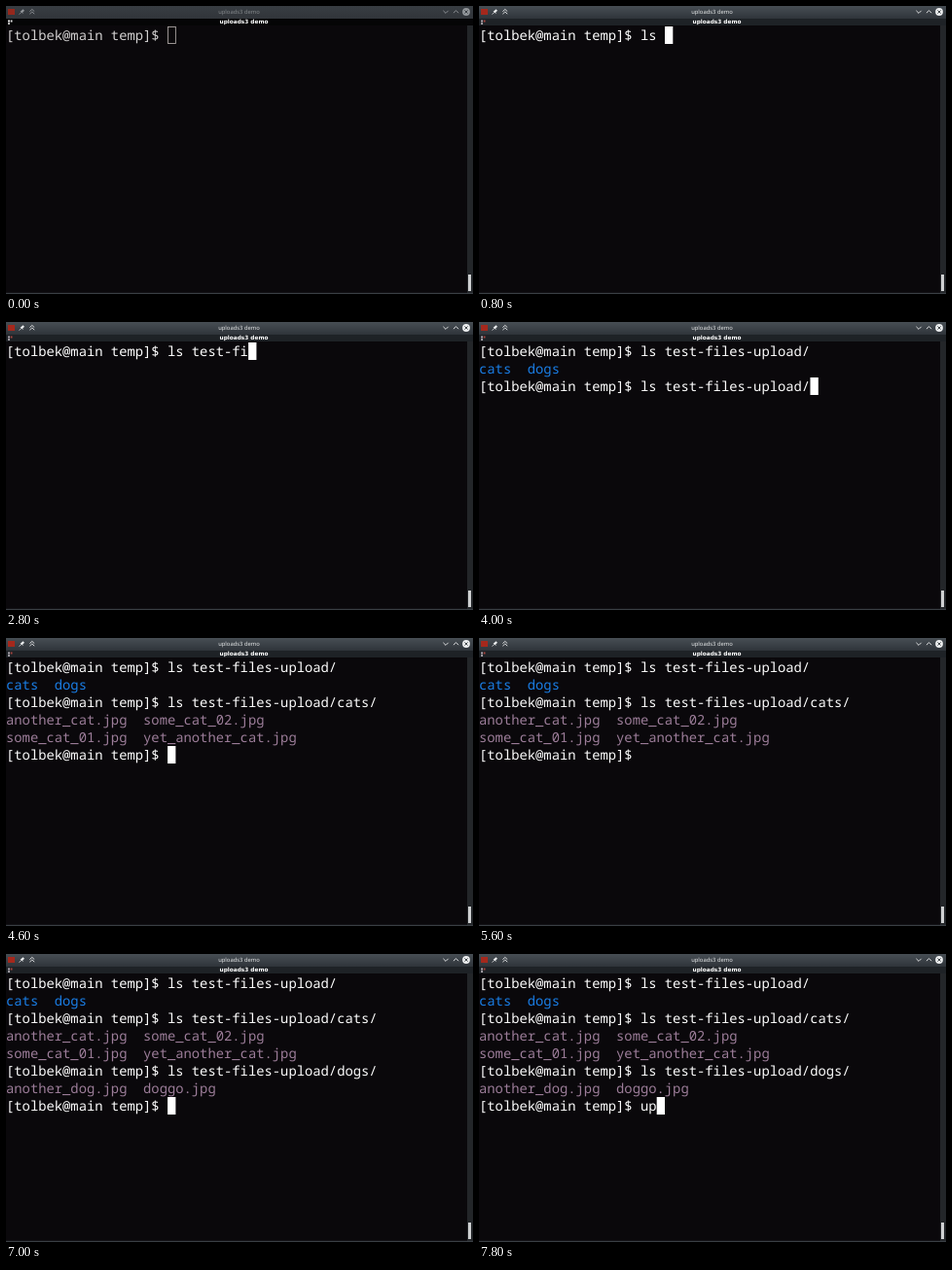
Animation, 480 px wide and 296 px high, one loop 8 s. Source, as an HTML page with a canvas:

```html
<!DOCTYPE html>
<html lang="en">
<head>
<meta charset="utf-8">
<title>uploads3 demo</title>
<style>
  html, body { margin: 0; width: 100%; height: 100%; overflow: hidden; background: #0a080b; }
  #stage { position: relative; width: 480px; height: 296px; overflow: hidden; text-rendering: geometricPrecision; }
  #stage > * { position: absolute; margin: 0; white-space: pre; }
  canvas { left: 0; top: 0; }
  #term {
    left: 0; top: 22px; color: #fdfdfd;
    font: 500 13.84px/18px "Noto Sans Mono", monospace;
    font-variant-ligatures: none;
  }
  #title, #tab { width: 100px; text-align: center; }
  #title { left: 189.5px; top: 0; font: 5.85px/12px "Noto Sans", sans-serif; color: #e4e6e7; }
  #tab { left: 194.5px; top: 13px; font: bold 5.8px/8px "DejaVu Sans", sans-serif; color: #fff; }
  .dir { color: #1a7ee6; }
  .img { color: #9c7d99; }
  .idle #term { color: #d2d0d0; font-weight: 400; }
  .idle #title { color: #83878a; }
</style>
</head>
<body>
<div id="stage">
  <canvas id="view" width="480" height="296"></canvas>
  <div id="title">uploads3 demo</div>
  <div id="tab">uploads3 demo</div>
  <pre id="term"></pre>
</div>
<script>
const LOOP = 8000, CELL = 8.304, ROW = 18, TOP = 21, FOCUS = 200, BLINK = 600;
const BELL = [1600, 2400];
const PROMPT = '[tolbek@main temp]$ ';
const LS = 'ls test-files-upload/';
const ENTER = '\n';

const $ = id => document.getElementById(id);
const ctx = $('view').getContext('2d');
const span = (kind, text) => `<span class="${kind}">${text}</span>`;

const outputs = [
  [span('dir', 'cats') + '  ' + span('dir', 'dogs')],
  [span('img', 'another_cat.jpg  some_cat_02.jpg'),
   span('img', 'some_cat_01.jpg  yet_another_cat.jpg')],
  [span('img', 'another_dog.jpg  doggo.jpg')]
];

// time of each key press and the command line after it
const keys = [
  [200, ''], [400, 'l'], [600, 'ls'], [800, 'ls '], [1000, 'ls t'],
  [1200, 'ls te'], [1400, 'ls tes'], [1600, 'ls test'], [2000, 'ls test-f'],
  [2800, 'ls test-fi'], [3000, 'ls test-fil'], [3200, LS], [3400, ENTER],
  [3800, LS], [4200, LS + 'c'], [4400, LS + 'cats/'], [4600, ENTER],
  [5800, LS + 'cats/'], [6000, LS + 'cats'], [6200, LS + 'ca'], [6400, LS + 'c'],
  [6600, LS + 'd'], [6800, LS + 'dogs/'], [7000, ENTER],
  [7600, 'u'], [7800, 'up']
];

function stateAt(t) {
  const lines = [];
  let cmd = '', last = 0, runs = 0;
  for (const [at, text] of keys) {
    if (at > t) break;
    if (text === ENTER) {
      lines.push(PROMPT + cmd, ...outputs[runs++]);
      cmd = '';
    } else cmd = text;
    last = at;
  }
  return {
    lines, cmd,
    idle: t < FOCUS,
    lit: (t - last) % (2 * BLINK) < BLINK,
    bell: t >= BELL[0] && t < BELL[1]
  };
}

function box(color, x, y, w, h) {
  ctx.fillStyle = color;
  ctx.fillRect(x, y, w, h);
}

function disc(color, x, y, r) {
  ctx.fillStyle = color;
  ctx.beginPath();
  ctx.arc(x, y, r, 0, 7);
  ctx.fill();
}

function line(color, width, ...pts) {
  ctx.strokeStyle = color;
  ctx.lineWidth = width;
  ctx.beginPath();
  for (let i = 0; i < pts.length; i += 2) ctx.lineTo(pts[i], pts[i + 1]);
  ctx.stroke();
}

const chevron = (color, x, y, w, h) => line(color, 0.9, x - w, y + h, x, y, x + w, y + h);

function drawFrame(idle, bell) {
  const ink = idle ? '#92969a' : '#eceeef';
  box('#0a080b', 0, 0, 480, 296);

  const bar = ctx.createLinearGradient(0, 0, 0, 13);
  bar.addColorStop(0, idle ? '#383d42' : '#474e54');
  bar.addColorStop(1, idle ? '#31353a' : '#2f343a');
  box(bar, 0, 0, 480, 13);
  box(idle ? '#050506' : '#1e2226', 0, 13, 480, 7);

  box(idle ? '#95281d' : '#a5281c', 2, 3, 7, 6);

  // pin
  line(ink, 2.2, 15.8, 6.4, 18.2, 4);
  line(ink, 0.8, 14.8, 5, 17.4, 7.6);
  line(ink, 0.8, 13.6, 8.6, 16, 6.2);

  chevron(ink, 26.8, 3.4, 2.4, 2.2);
  chevron(ink, 26.8, 6, 2.4, 2.2);
  chevron(ink, 452, 7.4, 2.6, -2.6);
  chevron(ink, 462.5, 4.6, 2.6, 2.6);
  disc(ink, 473, 6, 3.9);
  line('#33383d', 0.9, 471.4, 4.4, 474.6, 7.6);
  line('#33383d', 0.9, 474.6, 4.4, 471.4, 7.6);

  // group marker
  box(idle ? '#e6e6e6' : '#a9a4ac', 2, 14.5, 2, 2);
  box(idle ? '#e6e6e6' : '#a8453f', 4.7, 14.5, 1.8, 2);
  box(idle ? '#c8c8c8' : '#a9a4ac', 2, 17.2, 2, 1.8);

  if (bell) {
    disc('#c9cdcf', 474.5, 15.8, 2.3);
    box('#8f9497', 473.6, 17.8, 1.8, 1.6);
  }

  box('#232629', 474, 20, 6, 275);
  box('#cfd1d2', 475, 276, 3, 17);
  box('#3a3f44', 0, 294.8, 480, 1.2);
}

function drawCursor(s) {
  const x = (PROMPT.length + s.cmd.length) * CELL;
  const y = TOP + s.lines.length * ROW;
  if (s.idle) {
    ctx.strokeStyle = '#aaa4a2';
    ctx.lineWidth = 0.9;
    ctx.strokeRect(x + 0.4, y + 0.5, CELL - 0.4, ROW - 1);
  } else if (s.lit) box('#fff', x, y, CELL, ROW);
}

let shown = '';
function render(t) {
  const s = stateAt(t);
  const id = JSON.stringify(s);
  if (id === shown) return;
  shown = id;
  drawFrame(s.idle, s.bell);
  drawCursor(s);
  $('stage').className = s.idle ? 'idle' : '';
  $('tab').style.left = (s.bell ? 190.5 : 194.5) + 'px';
  $('term').innerHTML = [...s.lines, PROMPT + s.cmd].join('\n');
}

const start = performance.now();
function tick() {
  render((performance.now() - start) % LOOP);
  requestAnimationFrame(tick);
}
tick();
</script>
</body>
</html>
```
